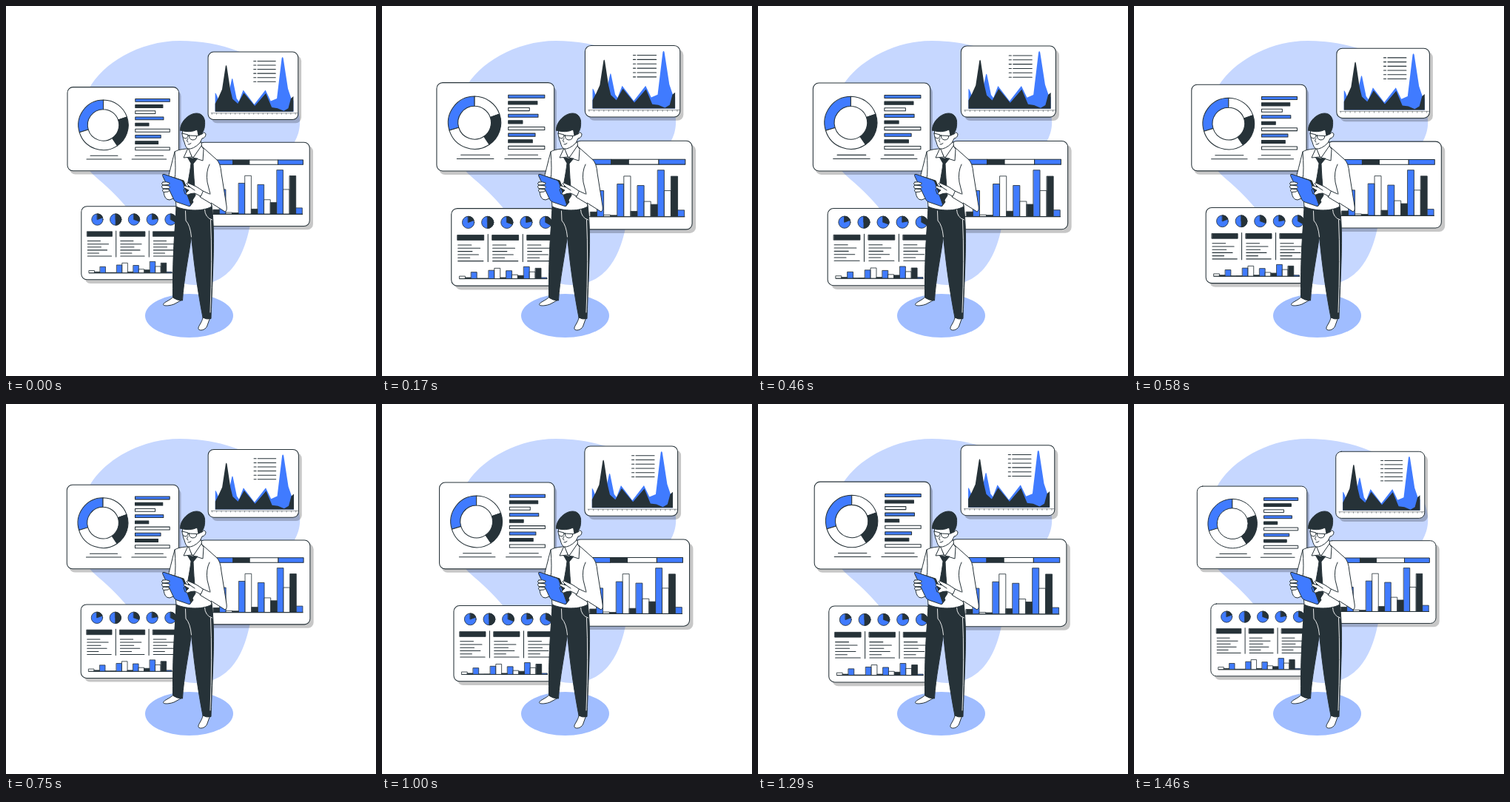
An HTML page for the animation above (1.5 s loop, 500 by 500 pixels).

```html
<!DOCTYPE html>
<html lang="en">
<head>
<meta charset="utf-8">
<title>Data report</title>
<style>
  @property --n { syntax: "<number>"; inherits: true; initial-value: 0; }

  html, body { margin: 0; width: 100%; height: 100%; overflow: hidden; background: #fff; }

  svg {
    --ink: #263238;
    --blue: #407bff;
    display: block;
    width: 100%;
    height: 100%;
    fill: none;
    stroke-linecap: round;
    stroke-linejoin: round;
    animation: tick 1.5s steps(36) -5ms infinite;
  }

  /* 24 steps a second; two beats, the first with a slow fall */
  @keyframes tick { from { --n: 0; } to { --n: 36; } }

  #panels {
    --p: calc(var(--n) + 1);
    --slow: min(var(--p) / 7.2, (21.6 - var(--p)) / 14.4);
    --fast: min((var(--p) - 21.6) / 7.2, (36 - var(--p)) / 7.2);
    transform-origin: 248.7px 218.7px;
    transform: scale(calc(.997 + .1 * max(var(--slow), var(--fast))));
  }

  .ink { fill: var(--ink); }
  .blue { fill: var(--blue); }
  .white { fill: #fff; }
  .shade { fill: #000; fill-opacity: .22; }
  .line { stroke: var(--ink); stroke-width: 1; }
  .thin { stroke: var(--ink); stroke-width: .8; }
  .light { stroke: #fff; stroke-width: .9; }
</style>
</head>
<body>
<svg viewBox="0 0 500 500" xmlns="http://www.w3.org/2000/svg">
  <path fill="#c6d7ff" d="M235 47C290 47 345 66 375 104C395 129 401 152 395 172C385 203 341 250 329 300C321 338 303 377 255 377C215 377 200 340 185 308C172 279 155 260 119 229C95 208 92 150 112 112C130 78 180 47 235 47Z"/>
  <ellipse cx="247.5" cy="418.5" rx="59.5" ry="29.5" fill="#a0bdff"/>

  <g id="panels">
    <g id="donut"></g>
    <g id="area"></g>
    <g id="bars"></g>
    <g id="table"></g>
  </g>

  <g id="man">
    <!-- shoes -->
    <path class="white line" d="M226 393C222 398 213 400 212.500 403.500C213 406 223 405 228 402.500L238 397Z"/>
    <path class="white line" d="M266 421C265 428 259 433 260 436.500C262 439.500 269 438 271.500 433L275.500 422Z"/>
    <!-- trousers -->
    <path class="ink line" d="M230 270C229 300 225 325 225.500 394Q231 398 238.500 398C240 370 247 338 250.500 311C254 350 260 390 266 421Q271 424 277 422.500C278 390 281 340 280.500 308Q280 285 278 269Z"/>
    <path class="light" d="M242.500 277L243 290Q249 296 250.500 312M268.500 275Q269 286 278.500 289M276.500 289Q279 340 276 414"/>
    <!-- shirt -->
    <path class="white line" d="M243 193Q232 194 228 197C224 212 221 225 217.500 238L213 251Q214 262 221 262L229 259L230 271C240 276 264 279 278 271L277 266L296 278Q299 277 298 270L291 226Q290 212 284 207Q275 199 266 191Z"/>
    <path class="line" d="M228 197Q230 222 228 234M275 214Q270 224 272 238L276 254M277 267L262 258L264 249L275 254"/>
    <!-- neck, collar and tie -->
    <path class="white line" d="M248 190L246 195L252 205L265 196L264 184Z"/>
    <path class="white line" d="M246 192L240 205L251 204ZM264 189L253 205L266 209L267 194Z"/>
    <path class="ink line" d="M246 205L252 206L259 206L253 213Q253.500 230 256 256L249 267L246 238Q249 222 250 213Z"/>
    <!-- head -->
    <path class="white line" d="M238.500 166Q238 179 241 184Q243 192 246 193Q253 194 262 185L265 179Q270 178 270 173Q268 169 265 173L260 163Z"/>
    <path class="ink line" d="M235.500 168C235 159 243 149 252 146C261 143 267 147 268.500 155C269 163 268 167 265 172L260 175L258.500 167Q248 172 235.500 168Z"/>
    <path class="white line" d="M238 172L246 174Q246 179 242 179Q238 178 238 172ZM247.500 175L257.500 175.500Q258 181 252 181Q247 180 247.500 175ZM246 175H247.500M257.500 176L265 173"/>
    <path class="line" d="M246 179Q243 183 246 184M246 187Q248 187.500 250 185.500"/>
    <!-- tablet -->
    <path class="ink line" d="M214 228L240 236L253 265L248.500 270.500Z"/>
    <path class="blue line" d="M211.500 229Q211 226.500 214 227.500L235.500 235Q238 236 239 238L249.500 268Q250 271 247 270.500L231 265Q228 264 227 262Z"/>
    <!-- hands -->
    <path class="white line" d="M212 238Q217 237 221 239Q222 241 219 241.500L212 242Q209 240 212 238ZM211.500 242L220 243Q223 245 220 246.500L212 247Q209 244 211.500 242ZM213 247L220 248Q222 250 219 251L213 251.500Q210 249 213 247Z"/>
    <path class="white line" d="M263 257L255 253Q249 253 246 255Q243 256 243 253L247 249L241 246Q239 243 242 243L249 245L244 240Q245 238 248 240L257 244Q262 247 266 250Z"/>
    <path class="line" d="M242 254L240 248L243 246M249 245L255 249"/>
  </g>
</svg>

<script>
  const rect = (cls, x, y, w, h, r = 0) =>
    `<rect class="${cls}" x="${x}" y="${y}" width="${w}" height="${h}" rx="${r}"/>`;
  const path = (cls, d) => `<path class="${cls}" d="${d}"/>`;
  const rule = (x, y, w) => `M${x} ${y}h${w}`;
  const put = (id, ...parts) => {
    document.getElementById(id).innerHTML = parts.flat().join("");
  };
  const at = (cx, cy, r, deg) => {
    const a = (deg - 90) * Math.PI / 180;
    return `${cx + r * Math.cos(a)} ${cy + r * Math.sin(a)}`;
  };

  // Ring slice, angles clockwise from the top; a zero inner radius gives a pie slice.
  const slice = (cls, cx, cy, r, hole, from, to) => {
    const big = to - from > 180 ? 1 : 0;
    return path(cls, `M${at(cx, cy, r, from)}A${r} ${r} 0 ${big} 1 ${at(cx, cy, r, to)}` +
      `L${at(cx, cy, hole, to)}A${hole} ${hole} 0 ${big} 0 ${at(cx, cy, hole, from)}Z`);
  };
  const card = (x, y, x2, y2, dx, dy) =>
    rect("shade", x + dx, y + dy, x2 - x, y2 - y, 7.5) +
    rect("white line", x, y, x2 - x, y2 - y, 7.5);
  const tones = ["blue", "white", "ink"];
  const columns = (x, base, step, first, heights) => heights.map((h, i) =>
    rect(tones[(i + first) % 3] + " thin", x + i * step, base - h, step - .3, h));

  put("donut",
    card(84.8, 110.8, 233.7, 222.7, 3, 4.7),
    slice("blue line", 132.8, 161.5, 33.4, 21, 253, 360),
    slice("white line", 132.8, 161.5, 33.4, 21, 0, 71),
    slice("ink line", 132.8, 161.5, 33.4, 21, 71, 146),
    slice("white line", 132.8, 161.5, 33.4, 21, 146, 253),
    [46, 36.7, 26.7, 37.7, 18, 46, 34, 30.5, 46].map((w, i) =>
      rect(["blue", "ink", "white"][i % 3] + " line", 175.6, 126.4 + 8.1 * i, w, 3.8)),
    path("line", rule(115.5, 202.4, 36.5) + rule(110.5, 207.2, 46.5) +
      rule(175.4, 202.4, 37.5) + rule(171, 207.2, 46)));

  const legend = [...Array(6).keys()].map(i =>
    rule(333.8, 76 + 5.5 * i, 3) + rule(339, 76 + 5.5 * i, 24)).join("");
  const ticks = [...Array(19).keys()].map(i => `M${278 + 6.2 * i} 145.700v1.500`).join("");
  put("area",
    card(272.8, 63.8, 393.2, 154.2, 4.3, 4.6),
    path("blue", "M282.300 143.600V118.500Q283.500 118 286 126L298 130L304.400 100.500Q305.100 98 305.800 100.500L311 126L314 130L319.800 114.700L334.500 134L349.500 114.700L356.600 129.500L364.800 126L371.300 72Q372.300 69 373.300 72L379.600 113L384 126L386.900 129V143.600Z"),
    path("ink", "M282.300 143.600V133L287 124L291.500 114L296.200 83Q297 80 297.800 83L302.500 114L305.500 126.500L312.500 133L320.700 118.500L335.300 136L350 119L358 138L365.700 139L374 142.500L380 139L383.500 126L386.900 123V143.600Z"),
    path("line", legend),
    `<g opacity=".6">${path("thin", rule(277, 145.5, 115.3) + ticks)}</g>`);

  put("bars",
    card(260, 184.6, 408.5, 296.7, 4.7, 4.7),
    rect("blue line", 268, 208, 38, 6.4),
    rect("ink line", 306, 208, 22, 6.4),
    rect("white line", 328, 208, 38.2, 6.4),
    rect("blue line", 366.2, 208, 33.6, 6.4),
    columns(279.7, 280.6, 8.52, 2,
      [6, 33, 2.2, 1.7, 41.4, 51.4, 6.8, 39.5, 19.3, 15.5, 59, 33, 51.2, 8.3]),
    path("line", rule(268, 280.7, 131)));

  const texts = [17, 28, 18, 26, 15, 32];
  put("table",
    card(103.4, 270.2, 236, 368.2, 4.6, 5),
    [70, 180, 110, 80, 120].map((deg, i) => {
      const x = 124.8 + 24.5 * i;
      return `<circle class="blue thin" cx="${x}" cy="287.8" r="7.6"/>` +
        slice("ink thin", x, 287.8, 7.6, 0, 0, deg);
    }),
    [111.2, 155.2, 199.3].map(x =>
      rect("ink thin", x, 303.9, 33.4, 6.4) +
      path("line", texts.map((w, i) => rule(x + .6, 316.5 + 4.06 * i, w)).join(""))),
    path("line", "M149.800 303v34.600M193.900 303v34.600"),
    columns(113.8, 359.2, 7.4, 1,
      [3.2, 1.4, 8.3, .5, .5, 10.6, 13.3, 1.4, 10.1, 5, 4, 15.2, 8.7, 13.3, 1.4]),
    path("thin", rule(113.8, 359.3, 111)));
</script>
</body>
</html>
```
